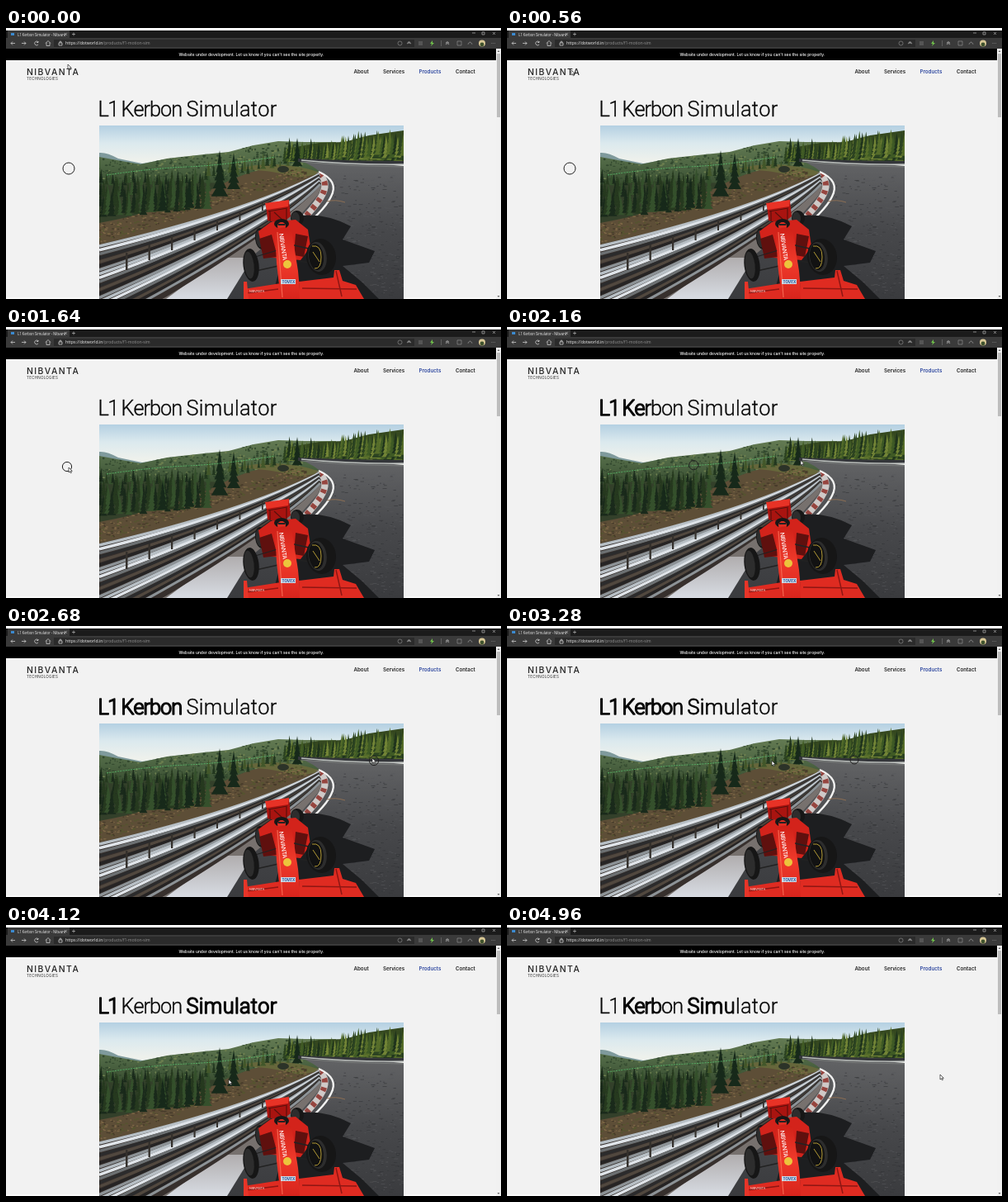
Write an HTML page with a canvas that moves like this. It is 600x328 px and loops after 5 s.

```html
<!DOCTYPE html>
<html lang="en">
<head>
<meta charset="utf-8">
<title>Simulator page</title>
<style>
html, body { margin: 0; height: 100%; overflow: hidden; background: #f2f2f2; }
canvas { display: block; }
</style>
</head>
<body>
<canvas id="stage" width="600" height="328"></canvas>
<script>
const LOOP = 5000, FADE = 250;
const view = document.getElementById('stage').getContext('2d');
const page = document.createElement('canvas');
page.width = 600;
page.height = 328;
const g = page.getContext('2d');

let seed = 7;
const rnd = () => (seed = seed * 16807 % 2147483647) / 2147483647;
const rand = (a, b) => a + (b - a) * rnd();
const clamp = v => Math.max(0, Math.min(1, v));

function box(color, x, y, w, h) {
  g.fillStyle = color;
  g.fillRect(x, y, w, h);
}
function shape(color, d) {
  g.fillStyle = color;
  g.fill(new Path2D(d));
}
function line(color, width, d) {
  g.strokeStyle = color;
  g.lineWidth = width;
  g.stroke(new Path2D(d));
}
function oval(color, x, y, rx, ry = rx, turn = 0) {
  g.fillStyle = color;
  g.beginPath();
  g.ellipse(x, y, rx, ry, turn, 0, 7);
  g.fill();
}
function label(text, x, y, font, color, spacing = 0) {
  g.font = font;
  g.letterSpacing = spacing + 'px';
  g.fillStyle = color;
  g.fillText(text, x, y);
}
function fade(y0, y1, ...colors) {
  const grad = g.createLinearGradient(0, y0, 0, y1);
  colors.forEach((c, i) => grad.addColorStop(i / (colors.length - 1), c));
  return grad;
}
function pine(x, base, h, color) {
  const w = h * 0.17;
  for (let i = 0; i < 5; i++) {
    const top = base - h + i * h * 0.17, r = w * (i + 1.3) / 5;
    shape(color, `M${x} ${top}l${r} ${h * 0.3}h${-2 * r}Z`);
  }
}
function forest(n, x0, x1, base, h0, h1, colors) {
  for (let i = 0; i < n; i++) {
    const x = x0 + (x1 - x0) * (i + rnd()) / n;
    pine(x, base(x) + rand(-3, 3), rand(h0, h1), colors[i % colors.length]);
  }
}

function drawBrowser() {
  box('#f2f2f2', 0, 0, 600, 328);
  box('#fff', 0, 0, 600, 3);
  box('#1b1b1b', 0, 3, 600, 10);
  box('#3a3a3a', 2, 3, 75, 10);
  box('#3a3a3a', 0, 12, 600, 13);
  box('#2b2b2b', 58, 14, 437, 9);
  box('#000', 0, 25, 594, 14);
  box('#3b8ad0', 6, 6, 4, 3);
  label('L1 Kerbon Simulator - Nibvant', 14, 9.5, '4.4px "Open Sans", sans-serif', '#e8e8e8', -.12);
  line('#ccc', .6, 'M71 6l3 3m0 -3l-3 3M80 7.5h4m-2 -2v4M565 6h4M577 5h3v3h-3ZM590 5l3 3m0 -3l-3 3');
  line('#ddd', .7, 'M11 18.5H6l2 -2m-2 2l2 2M19 18.5h5l-2 -2m2 2l-2 2M39 17a2.4 2.4 0 1 0 0 3m0 -4v1.5h-2M48 18.5l3 -3l3 3m-5 -1v4h4v-4M64 18h4v3h-4Zm1 0v-1a1 1 0 0 1 2 0v1');
  label('https://dotworld.in', 72, 20.4, '5.2px "Open Sans", sans-serif', '#f4f4f4');
  const host = g.measureText('https://dotworld.in').width;
  label('/products/f1-motion-sim', 72 + host, 20.4, '5.2px "Open Sans", sans-serif', '#929292', -.1);
  line('#999', .6, 'M475 18.5a2.5 2.5 0 1 0 5 0a2.5 2.5 0 1 0 -5 0M486 19l2.5 -3l2.5 3l-4 -1.5h3ZM533 20l2 -4l2 4l-4 -2.5h4ZM547 16h5v5h-5ZM560 20a2.5 2.5 0 0 1 5 0M562 17h1');
  box('#555', 500, 16, 5, 5);
  box('#777', 527, 15, .6, 7);
  shape('#6fc04a', 'M517 15l-3 4h2l-1 3l4 -4h-2Z');
  oval('#d8c795', 577, 18.5, 4);
  oval('#40542e', 577, 20, 2.4);
  label('...', 588, 19, '6px Inter, sans-serif', '#ddd');
  box('#f1f1f1', 594, 25, 6, 303);
  box('#bdbdbd', 595, 31, 4, 77);
  shape('#666', 'M595.5 29l1.5 -2l1.5 2ZM595.5 324l1.5 2l1.5 -2Z');
  box('#fafafa', 0, 326, 113, 2);
  box('#fafafa', 482, 326, 112, 2);

  g.textAlign = 'center';
  label("Website under development. Let us know if you can't see the site properly.", 297.5, 33.7, '500 4.95px Inter, sans-serif', '#fff');
  g.textAlign = 'left';
  label('NIBVANTA', 25, 57.4, '500 10.4px Inter, sans-serif', '#222', 1.45);
  label('TECHNOLOGIES', 25, 63.3, '4.6px Inter, sans-serif', '#333', .2);
  [['About', 421.5], ['Services', 457], ['Products', 500.5], ['Contact', 545]].forEach(([name, x]) =>
    label(name, x, 55, '600 6.2px Inter, sans-serif', name === 'Products' ? '#2d479f' : '#222'));
}

function drawLand() {
  box(fade(118, 160, '#b4d0e2', '#dbe9ee', '#eef1ec'), 113, 118, 369, 210);
  shape('#7f9a9c', 'M113 151Q122 150 136 158L165 164L205 157L250 153V190H113Z');
  const hill = 'M113 156L140 161L163 165L195 158L240 153L270 150L300 142L330 137L362 138L400 138V235H113Z';
  shape(fade(137, 195, '#637a52', '#4d6543', '#34482c'), hill);
  g.save();
  g.clip(new Path2D(hill));
  for (let i = 0; i < 700; i++) {
    const x = rand(113, 360), y = rand(140, 198);
    oval(i % 4 ? '#33492f' : '#6f8050', x, y, rand(.6, 2), rand(.5, 1.4));
  }
  g.restore();

  shape('#33402a', 'M113 190Q190 182 260 188L300 195L250 235L113 265Z');
  shape('#5d4e37', 'M113 236Q190 222 250 195Q300 168 340 167L383 175L345 200L225 238L113 266Z');
  shape('#66673b', 'M278 171Q330 157 384 176L355 181Q315 170 278 171Z');
  for (let i = 0; i < 420; i++) {
    const u = rnd(), x = 113 + 250 * u;
    const y = 250 - 75 * u + rand(-12, 10) * (1 - u * .4);
    oval(['#473b2a', '#7d6746', '#55552f'][i % 3], x, y, rand(.8, 2.4), .8);
  }
  const dark = ['#1a2a1b', '#26391f', '#35502c'];
  for (let row = 0; row < 4; row++) {
    forest(30, 114, 245, x => 190 + row * 13 - (x - 113) * .03 * row, 12 + row * 3, 20 + row * 4, dark);
  }
  forest(20, 240, 345, x => 183 - (x - 240) * .17, 8, 20, ['#22371f', '#42572a']);

  shape('#35481f', 'M340 160V146L380 139L410 138L440 130L482 124V162Z');
  const leaves = ['#2c4321', '#566d2a', '#3f5a25', '#1f331c', '#728436'];
  forest(42, 338, 412, x => 160, 13, 26, leaves);
  forest(46, 405, 482, x => 160, 20, 32, leaves);
  forest(22, 420, 482, x => 159 - (x - 420) * .06, 25, 36, leaves);
  for (const [x, base, h] of [[259, 205, 57], [276, 196, 45], [190, 222, 37], [222, 218, 37], [353, 168, 35]]) {
    pine(x, base, h, '#17291a');
  }
  oval('#2c3328', 336, 171, 7, 4);
  g.setLineDash([2, 1.2]);
  line('#58b96a', .9, 'M122 178Q175 170 220 168T326 156');
  g.setLineDash([]);
}

function drawTrack() {
  shape(fade(160, 328, '#636466', '#47484b', '#3a3b3e'), 'M355 160Q420 161 482 167V328H195L340 232Q398 195 382 176Q374 167 355 160Z');
  for (let i = 0; i < 350; i++) box(i % 2 ? '#56575a' : '#333437', rand(395, 481), rand(176, 326), rand(1, 5), .6);
  line('#34363a', 4, 'M354 160Q420 163 482 163');
  line('#b9bdba', 1.3, 'M358 160Q420 166 482 165');
  line('#7e827f', .9, 'M358 162Q420 168 482 168');

  shape('#77716e', 'M378 174Q390 185 378 202L350 234L235 328H190L335 224Z');
  shape(fade(270, 328, '#aaa6a6', '#d8dce3'), 'M262 278L293 278L289 294L268 328H194Z');
  const kerb = 'M379 177Q393 187 381 206Q365 230 325 264';
  line('#cfc9c7', 8, kerb);
  g.setLineDash([5, 6]);
  line('#96453f', 7, kerb);
  g.setLineDash([]);
  line('#f1f1f0', 2.4, 'M379 174Q404 185 394 204Q386 222 345 254');
  line('#8d6f54', 1, 'M389 210q10 -3 22 1');

  // Guard rail: stripes blended between an upper and a lower curve
  g.save();
  g.beginPath();
  g.rect(113, 118, 369, 210);
  g.clip();
  shape('#37302d', 'M113 262Q290 222 380 177L382 190Q335 240 190 328H113Z');
  const steel = ['#b7bfc5', '#dfe4e9', '#6c7072', '#2b2b2c', '#51483f', '#262424', '#8c9296'];
  for (let i = 0; i < 21; i++) {
    const s = i / 20;
    line(steel[i % 7], 3.6 - s * .4,
      `M113 ${264 + 96 * s}Q${290 + 32 * s} ${223 + 27 * s} ${380 + s} ${177 + 12 * s}`);
  }
  for (let i = 0; i < 7; i++) {
    const s = i / 8;
    box('#34302c', 145 + 220 * s, 272 - 80 * s, 2.5 - s, 16 * (1 - s) + 5);
  }
  g.restore();
}

function wheel(x, y, rx, ry) {
  oval('#161616', x, y, rx, ry, -.12);
  oval('#2d2d2d', x - rx * .25, y, rx * .62, ry * .82, -.12);
}

function drawCar() {
  shape('#1d1e20', 'M348 228Q385 222 418 240L408 256L447 270L440 284L408 288L432 308L452 328H322Z');
  wheel(353, 230, 8, 9);
  wheel(309, 255, 7, 13);
  shape('#a91410', 'M315 213L343 209L345 228L333 237L317 233Z');
  shape('#e83226', 'M314 212L343 208L342 216L316 220Z');
  line('#5a100c', 1.2, 'M318 222l23 -4M320 221v13M340 219v14M325 223l11 10');
  shape('#d3231b', 'M306 246L321 235L351 232L366 244L369 265L357 281L312 277Z');
  shape('#5f100e', 'M307 255L322 250L329 277L312 279ZM351 249L366 252L361 277L349 275Z');
  oval('#181717', 334, 237, 9, 6);
  oval('#df2e23', 334, 240, 5, 5);
  box('#222', 330, 237, 8, 2);
  line('#222', 1.3, 'M302 277L329 269M303 294L330 288M349 263L376 269M353 282L376 285');
  wheel(297, 287, 9.5, 20);
  wheel(382, 277, 18, 22);
  oval('#121212', 376, 277, 9, 16, -.12);
  line('#b39a35', 1, 'M371 264Q382 262 382 277T374 291M372 271l8 12');
  shape(fade(240, 328, '#cf2018', '#ef3a2b', '#d7241c'), 'M326 244Q337 239 346 244L354 294L357 328H333L328 285Z');
  line('#f6654f', 1.2, 'M329 247L335 326');
  shape('#df2b21', 'M288 316L333 309V328H291ZM355 307L397 302L398 293H404L408 306L424 311L434 328H356Z');
  line('#8e1613', 1.5, 'M290 321L330 316M359 315L425 316M400 294l7 31');
  shape('#e83528', 'M288 307h4l2 21h-6Z');
  label('NIBVANTA', 295, 320, '3.8px Inter, sans-serif', '#f6dfd8', -.1);
  g.save();
  g.translate(331, 249);
  g.rotate(1.43);
  label('NIBVANTA', 0, 0, '500 7px Inter, sans-serif', '#fff', -.4);
  g.restore();
  oval('#ecc53c', 341, 286, 5);
  box('#cfd9e4', 333, 304, 18, 6);
  label('TOVEX', 334.5, 308.8, '700 4.6px Inter, sans-serif', '#25559b');
}

function drawPage() {
  drawBrowser();
  g.save();
  g.beginPath();
  g.rect(113, 117.5, 369, 211);
  g.clip();
  drawLand();
  drawTrack();
  drawCar();
  g.restore();
}

// Each step: start time, change in weight, delay per letter (negative: from the last letter)
const words = [
  { text: 'L1', x: 111.5, spacing: -1.6, steps: [[1800, 1, 130], [4300, -1, 130]] },
  { text: 'Kerbon', x: 139.5, spacing: -1, steps: [[1750, 1, 130], [3200, -1, -130], [4400, 1, 130]] },
  { text: 'Simulator', x: 218.5, spacing: .35, steps: [[3150, 1, 20], [4220, -1, -130]] }
];

function drawHeading(t) {
  view.font = '300 25.3px Roboto, sans-serif';
  view.fillStyle = view.strokeStyle = '#080808';
  view.lineJoin = 'round';
  for (const { text, x, spacing, steps } of words) {
    let pen = x;
    [...text].forEach((letter, i) => {
      const weight = steps.reduce((sum, [start, change, delay]) => {
        const order = delay < 0 ? text.length - 1 - i : i;
        return sum + change * clamp((t - start - order * Math.abs(delay)) / FADE);
      }, 0);
      view.fillText(letter, pen, 106.5);
      view.lineWidth = .3 + 1.2 * weight;
      view.strokeText(letter, pen, 106.5);
      pen += view.measureText(letter).width + spacing;
    });
  }
}

// Stops: time, x, y
const pointerPath = [[0, 75, 44], [560, 78, 51], [1120, 76, 130], [1600, 76, 170], [1700, 76, 170], [2300, 400, 160],
  [2680, 444, 160], [3280, 321, 163], [3620, 526, 172], [4120, 270, 187], [4440, 559, 182], [4960, 525, 181]];
const ringPath = [[0, 76, 170], [1200, 76, 170], [1640, 74, 169], [1760, 77, 170], [2680, 446, 163], [3280, 421, 162], [3500, 410, 163]];

function along(path, t) {
  const i = path.findIndex(p => p[0] > t);
  if (i < 0) return path[path.length - 1].slice(1);
  const a = path[i - 1], b = path[i], u = (t - a[0]) / (b[0] - a[0]);
  const s = u * u * (3 - 2 * u);
  return [a[1] + (b[1] - a[1]) * s, a[2] + (b[2] - a[2]) * s];
}

function drawPointer(t) {
  if (t < 3500) {
    const [x, y] = along(ringPath, t);
    view.strokeStyle = '#222';
    view.lineWidth = 1;
    view.beginPath();
    view.arc(x, y, t < 1200 ? 7 : t < 2900 ? 5.6 : 5, 0, 7);
    view.stroke();
  }
  const [x, y] = along(pointerPath, t);
  const arrow = new Path2D(`M${x} ${y}v6l1.4 -1.2l1 2l1 -.5l-1 -2h1.9Z`);
  view.fillStyle = '#fff';
  view.strokeStyle = '#222';
  view.lineWidth = .7;
  view.fill(arrow);
  view.stroke(arrow);
}

function render(now) {
  const t = now % LOOP;
  view.drawImage(page, 0, 0);
  drawHeading(t);
  drawPointer(t);
  requestAnimationFrame(render);
}

drawPage();
requestAnimationFrame(render);
</script>
</body>
</html>
```
